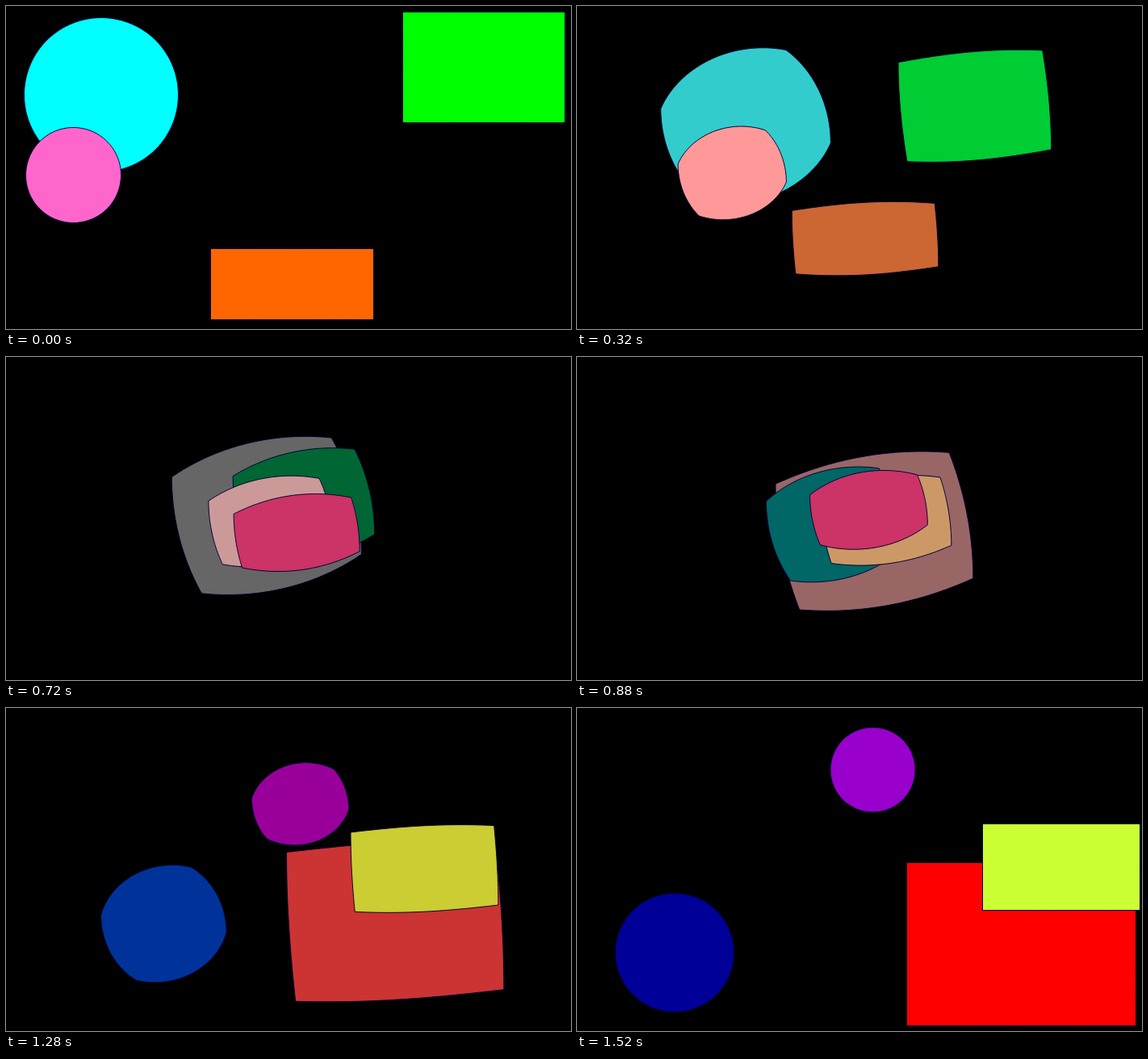
Recreate the animation shown at these times as an HTML page with a canvas. Size 700 px wide and 400 px high, loop 1600 ms.

```html
<!DOCTYPE html>
<html>
<head>
<meta charset="utf-8">
<style>
  html, body { margin: 0; width: 100%; height: 100%; overflow: hidden; background: #000; }
  canvas { display: block; }
</style>
</head>
<body>
<canvas id="stage" width="700" height="400"></canvas>
<script>
const ctx = document.getElementById('stage').getContext('2d');
const STEPS = 20, STEP_MS = 80, SIDE_POINTS = 40;

// circle: [cx, cy, r], rect: [left, top, right, bottom]; listed back to front
const shapes = [
  { circle: [118, 110, 95.5], rect: [408.5, 191.5, 692.5, 393.5],
    circleColor: [0, 240, 240], rectColor: [240, 0, 0] },
  { circle: [121, 303, 73.5], rect: [491.5, 7.5, 692.5, 144.5],
    circleColor: [0, 0, 160], rectColor: [0, 240, 0], startsAsRect: true },
  { circle: [83.5, 209.5, 59], rect: [502.5, 143.5, 697.5, 250.5],
    circleColor: [240, 100, 200], rectColor: [200, 235, 50] },
  { circle: [366.5, 76.5, 52.5], rect: [253.5, 300.5, 455.5, 388.5],
    circleColor: [150, -2, 200], rectColor: [240, 98, 0], startsAsRect: true },
];

const lerp = (a, b, t) => a + (b - a) * t;
const webSafe = v => Math.round(v / 51) * 51;

// Both outlines run clockwise by share of perimeter, from the top-left corner / leftmost point.
function tracePath({ circle: [cx, cy, r], rect: [x0, y0, x1, y1] }, squareness) {
  const corners = [[x0, y0], [x1, y0], [x1, y1], [x0, y1]];
  const w = x1 - x0, h = y1 - y0;
  let angle = Math.PI;
  ctx.beginPath();
  corners.forEach(([ax, ay], side) => {
    const [bx, by] = corners[(side + 1) % 4];
    const sweep = Math.PI * (side % 2 ? h : w) / (w + h);
    for (let i = 0; i < SIDE_POINTS; i++) {
      const u = i / SIDE_POINTS, a = angle + sweep * u;
      ctx.lineTo(
        lerp(cx + r * Math.cos(a), lerp(ax, bx, u), squareness),
        lerp(cy + r * Math.sin(a), lerp(ay, by, u), squareness));
    }
    angle += sweep;
  });
  ctx.closePath();
}

function draw(now) {
  const t = Math.floor(now / STEP_MS) % STEPS / (STEPS - 1);
  ctx.fillStyle = '#000';
  ctx.fillRect(0, 0, 700, 400);
  ctx.strokeStyle = '#003';
  for (const shape of shapes) {
    const squareness = shape.startsAsRect ? 1 - t : t;
    const color = shape.circleColor.map((c, i) => webSafe(lerp(c, shape.rectColor[i], squareness)));
    tracePath(shape, squareness);
    ctx.fillStyle = `rgb(${color})`;
    ctx.fill();
    ctx.stroke();
  }
}

const start = performance.now();
function tick() {
  draw(performance.now() - start);
  requestAnimationFrame(tick);
}
tick();
</script>
</body>
</html>
```
